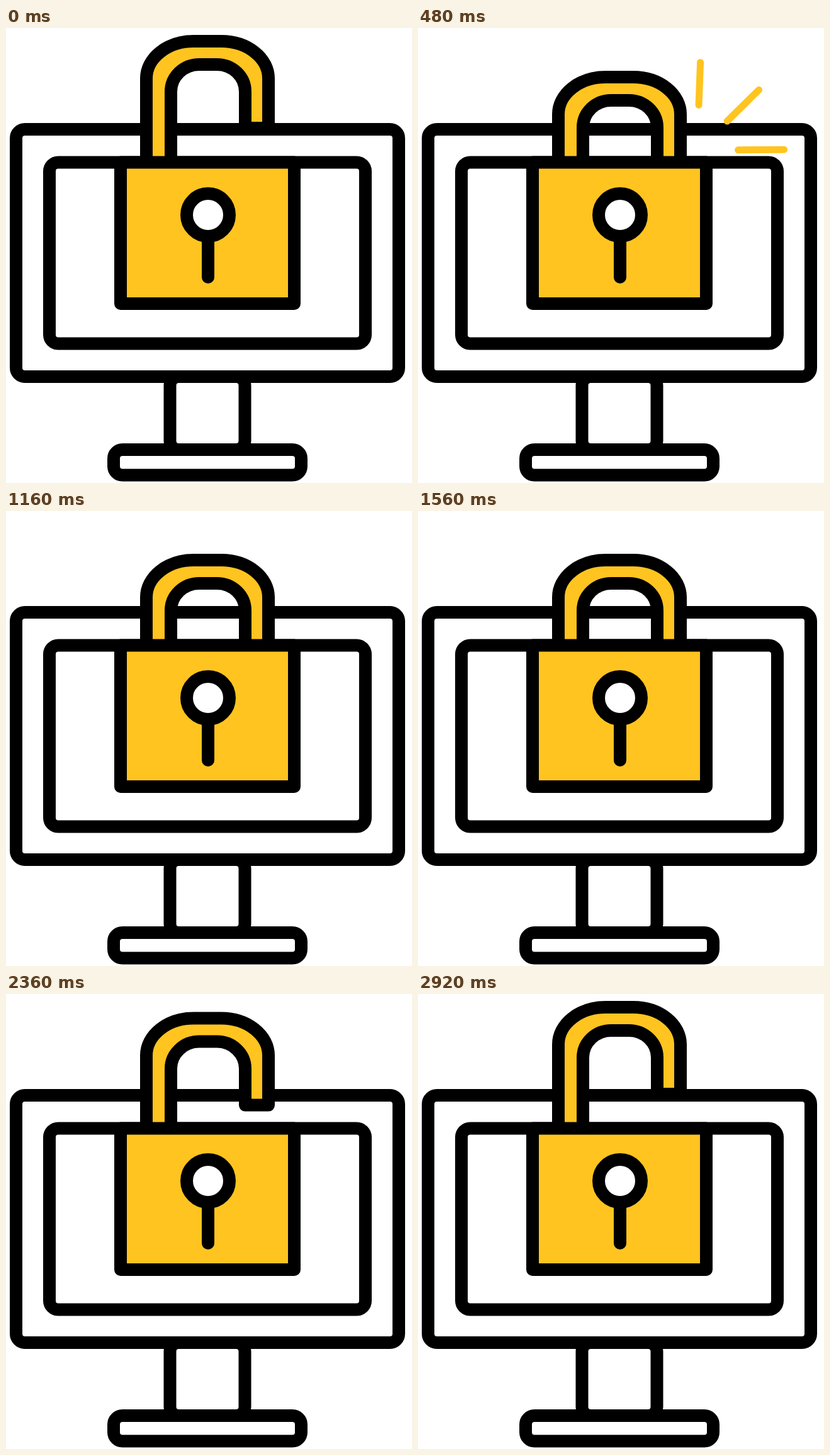
These frames come from a looping animation (645 px wide and 723 px high, 2960 ms). An HTML page:

```html
<!DOCTYPE html>
<html lang="en">
<head>
<meta charset="utf-8">
<title>Padlock</title>
<style>
  html, body { margin: 0; width: 100%; height: 100%; overflow: hidden; background: #fff; }
  svg { display: block; width: 645px; height: 723px; }
  .ink { fill: #fff; stroke: #000; stroke-width: 20; stroke-linejoin: round; stroke-linecap: round; }
  .gold { fill: #ffc41f; }
  .spark { stroke: #ffc41f; stroke-width: 11; stroke-linecap: round; }
</style>
</head>
<body>
<svg viewBox="0 0 645 723">
  <g class="ink">
    <rect x="260.5" y="554" width="119" height="116" rx="14"/>
    <rect x="171" y="670" width="298" height="40.5" rx="14"/>
    <rect x="16" y="161" width="608" height="393" rx="14"/>
    <rect x="69" y="213.5" width="502" height="288" rx="14"/>
    <path id="shackle" class="gold" d="M223 214V80A75 59 0 0 1 298 21H342A75 59 0 0 1 417 80V159H380V101A45 43 0 0 0 335 58H307A45 43 0 0 0 262 101V214Z"/>
    <rect class="gold" x="182" y="213.5" width="276" height="224.5"/>
    <path d="M321 336V396"/>
    <circle cx="321" cy="297" r="34"/>
  </g>
  <g id="sparks"></g>
</svg>
<script>
const LOOP = 2960;
const DROP = 57;
// Each ray: start x, y, end x, y
const rays = [
  [445, 150.5, 449.5, 31],
  [470.5, 168.5, 559, 81],
  [478.5, 194, 607, 193]
];

const shackle = document.getElementById('shackle');
const sparks = document.getElementById('sparks');
const lines = rays.map(() => {
  const line = document.createElementNS('http://www.w3.org/2000/svg', 'line');
  line.setAttribute('class', 'spark');
  return sparks.appendChild(line);
});

function ease(t, from, to) {
  const x = Math.min(1, Math.max(0, (t - from) / (to - from)));
  return x * x * (3 - 2 * x);
}

function draw(t) {
  const y = DROP * (ease(t, 17, 368) - ease(t, 2067, 2533));
  shackle.setAttribute('transform', `translate(0 ${y})`);

  const head = ease(t, 183, 600);
  const tail = ease(t, 350, 767);
  sparks.style.display = head > tail ? '' : 'none';
  rays.forEach(([x1, y1, x2, y2], i) => {
    const place = (n, k) => {
      lines[i].setAttribute('x' + n, x1 + (x2 - x1) * k);
      lines[i].setAttribute('y' + n, y1 + (y2 - y1) * k);
    };
    place(1, tail);
    place(2, head);
  });
}

const start = performance.now();
function tick() {
  draw((performance.now() - start) % LOOP);
  requestAnimationFrame(tick);
}
tick();
</script>
</body>
</html>
```
